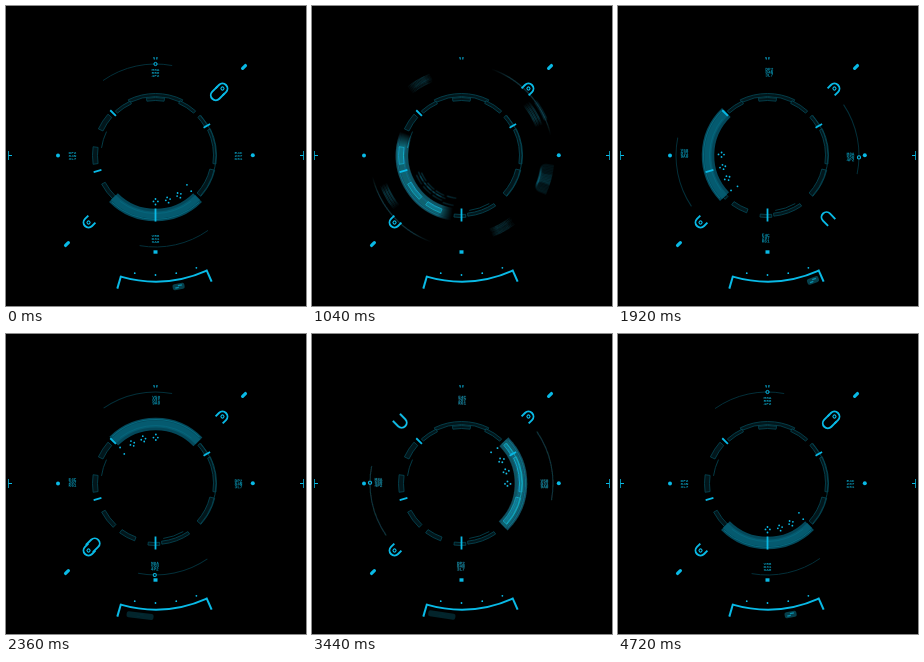
Recreate the animation shown at these times as an HTML page with a canvas. Size 300x300 px, loop 4760 ms.

```html
<!DOCTYPE html>
<html>
<head>
<meta charset="utf-8">
<style>
  html, body { margin: 0; width: 100%; height: 100%; overflow: hidden; background: #000; }
  canvas { display: block; }
</style>
</head>
<body>
<canvas id="stage" width="300" height="300"></canvas>
<script>
const stage = document.getElementById('stage').getContext('2d');
const layer = stage.canvas.cloneNode().getContext('2d');
let ctx = stage;   // context the helpers draw on

const LOOP = 4760, SPIN = 600, SHUTTER = 18, TAU = Math.PI * 2;
const BRIGHT = '#09bae6', TEXT = '#0890ae', DIM = '#064a57', FAINT = '#032f39';

const spinMids = [1023, 2150, 3277, 4409];   // middle of each quarter turn
const spinRests = [0, 91, 180.8, 271.5, 360];
const pointerRests = [80, 70, 100, 90, 80];

const rad = deg => deg * Math.PI / 180;
const clamp = x => Math.max(0, Math.min(1, x));
const expoInOut = p => p <= 0 ? 0 : p >= 1 ? 1
  : p < .5 ? 2 ** (20 * p - 10) / 2 : 1 - 2 ** (10 - 20 * p) / 2;

function stepped(t, rests, delay, duration) {
  return spinMids.reduce((v, mid, k) =>
    v + (rests[k + 1] - rests[k]) * expoInOut((t - mid - delay) / duration + .5), rests[0]);
}

function polar(r, deg) {
  return [r * Math.cos(rad(deg)), r * Math.sin(rad(deg))];
}

function line(points, color, width) {
  ctx.beginPath();
  points.forEach(p => ctx.lineTo(...p));
  ctx.strokeStyle = color;
  ctx.lineWidth = width;
  ctx.stroke();
}

const spoke = (deg, r0, r1, color, width) => line([polar(r0, deg), polar(r1, deg)], color, width);

function arc(r, a0, a1, color, width) {
  ctx.beginPath();
  ctx.arc(0, 0, r, rad(a0), rad(a1));
  ctx.strokeStyle = color;
  ctx.lineWidth = width;
  ctx.stroke();
}

function dot(x, y, r, color = BRIGHT) {
  ctx.beginPath();
  ctx.arc(x, y, r, 0, TAU);
  ctx.fillStyle = color;
  ctx.fill();
}

function ring(x, y, r, width) {
  ctx.beginPath();
  ctx.arc(x, y, r, 0, TAU);
  ctx.strokeStyle = BRIGHT;
  ctx.lineWidth = width;
  ctx.stroke();
}

function rotated(deg, draw) {
  ctx.save();
  ctx.rotate(rad(deg));
  draw();
  ctx.restore();
}

// Outlined piece of the dial
function band(r0, r1, a0, a1) {
  ctx.beginPath();
  ctx.arc(0, 0, r1, rad(a0), rad(a1));
  ctx.arc(0, 0, r0, rad(a1), rad(a0), true);
  ctx.closePath();
  ctx.fillStyle = '#02161b';
  ctx.fill();
  ctx.strokeStyle = DIM;
  ctx.lineWidth = .8;
  ctx.stroke();
}

// Half capsule on the x axis; the sign of arm tells where it opens
function cup(x, arm) {
  ctx.beginPath();
  ctx.moveTo(x + arm, -5);
  ctx.lineTo(x, -5);
  ctx.arc(x, 0, 5, -Math.PI / 2, Math.PI / 2, arm > 0);
  ctx.lineTo(x + arm, 5);
  ctx.strokeStyle = BRIGHT;
  ctx.lineWidth = 1.9;
  ctx.stroke();
}

function drawDial() {
  band(59, 62, -116, -64);
  band(55, 58, -99, -81);
  band(57, 60, -132, -115);
  band(57, 60, -66, -48);
  band(58, 63, -155, -139);
  band(58, 63, 172, 188);
  band(57, 61, 134, 152);
  band(57, 61, 110, 126);
  band(58, 61, 56, 84);
  band(59, 62, 86, 97);
  band(57, 60, -42, -31);
  band(58, 61, -26, 8);
  band(56, 61, 14, 42);
  arc(54.5, 188, 206, DIM, .8);
  arc(55.5, 60, 82, DIM, .8);
  arc(60.5, -42, 42, DIM, .8);
}

function drawFixed() {
  spoke(-135, 56, 64, BRIGHT, 1.8);
  spoke(-30, 55.5, 63, BRIGHT, 1.8);
  spoke(165, 56, 64, BRIGHT, 1.8);
  spoke(90, 53, 66, BRIGHT, 1.8);

  for (const deg of [-45, 135]) rotated(deg, () => {
    cup(94.7, -4.7);
    ring(94.7, 0, 1.5, 1.1);
    ctx.lineCap = 'round';
    line([[123.2, 0], [127.2, 0]], BRIGHT, 3.2);
    ctx.lineCap = 'butt';
  });

  dot(-97.5, 0, 2);
  dot(97.3, -.3, 2);
  line([[-2, 96.5], [2, 96.5]], BRIGHT, 3.4);
  line([[-1.6, -98.5], [-1.2, -96]], BRIGHT, 1);
  line([[1.5, -98.5], [1.3, -96]], BRIGHT, 1);

  arc(126, 66, 106, BRIGHT, 2);
  spoke(66, 125, 138, BRIGHT, 2);
  spoke(106, 125, 138.5, BRIGHT, 2);
  for (const deg of [70, 80, 90, 100]) dot(...polar(119.5, deg), .9);
}

const labels = [['M8A', '550', '4P2'], ['E4C', '207', 'K61'], ['V58', 'D31', '9A0'], ['DP2', '84N', '3L7']];

function drawLabels(turn) {
  const upright = Math.round(turn / 90) * 90;
  ctx.font = 'bold 4.4px "Liberation Mono", monospace';
  ctx.textAlign = 'center';
  ctx.textBaseline = 'middle';
  ctx.fillStyle = TEXT;
  labels.forEach((rows, i) => {
    ctx.save();
    ctx.translate(...polar(83, i * 90 - 90));
    ctx.rotate(rad(-upright));
    rows.forEach((row, j) => ctx.fillText(row, 0, (j - 1) * 2.9));
    ctx.restore();
  });
}

function drawSpinner(turn) {
  arc(59.5, 45, 135, '#04485a', 12.5);
  arc(59.5, 45, 135, '#055a6f', 7);
  arc(64, 47, 133, '#066a80', 1);
  arc(58, 52, 128, '#066a80', .8);
  for (const a of [90, 74.5, 59.5]) {
    dot(...polar(43.5, a), .9);
    dot(...polar(46, a - 3), .9);
    dot(...polar(46, a + 2.5), .9);
    dot(...polar(49, a), .9);
  }
  dot(...polar(43, 43), .9);
  dot(...polar(50.5, 45), .9);
  arc(91.5, -125, -79.5, FAINT, 1);
  arc(91.5, 55, 100, FAINT, 1);
  ring(0, -91.5, 1.6, 1);
  rotated(-45, () => cup(85.3, 7.5));
  drawLabels(turn);
}

function drawSpinnerLayer(turn) {
  ctx = layer;
  ctx.clearRect(0, 0, 300, 300);
  ctx.save();
  ctx.translate(149.5, 149.5);
  rotated(turn, () => drawSpinner(turn));
  ctx.restore();
  ctx = stage;
}

// Average several poses across the shutter while the spinner is fast
function drawBlurred(t) {
  const turnAt = time => stepped(time, spinRests, 0, SPIN);
  const sweep = turnAt(t + SHUTTER / 2) - turnAt(t - SHUTTER / 2);
  const samples = sweep < .4 ? 1 : 14;
  ctx.save();
  ctx.globalCompositeOperation = samples > 1 ? 'lighter' : 'source-over';
  ctx.globalAlpha = 1 / samples;
  for (let i = 0; i < samples; i++) {
    drawSpinnerLayer(turnAt(t + ((i + .5) / samples - .5) * SHUTTER));
    ctx.drawImage(layer.canvas, -149.5, -149.5);
  }
  ctx.restore();
}

function drawPointer(t) {
  if (spinMids.some(mid => t > mid - 60 && t < mid + 100)) return;
  const angle = stepped(t, pointerRests, 185, 240);
  const stretch = Math.max(...spinMids.map(mid =>
    Math.sin(Math.PI * clamp((t - mid - 65) / 240))));
  rotated(angle - 90, () => {
    const half = 6 + 8 * stretch;
    ctx.globalAlpha = 1 - .45 * stretch;
    ctx.beginPath();
    ctx.roundRect(-half, 130, 2 * half, 6, 2);
    ctx.fillStyle = '#06404c';
    ctx.fill();
    ctx.globalAlpha = 1 - stretch;
    line([[-3.5, 134], [0, 134]], TEXT, 1.3);
    line([[-.5, 132], [3.5, 132]], TEXT, 1.3);
    ctx.globalAlpha = 1;
  });
}

function drawSideMarks(t) {
  const phase = t % 400;
  if (phase >= 80 && phase < 160) return;
  for (const side of [-1, 1]) {
    const x = side * 147.5 + .5;
    line([[x, -4.5], [x, 4.5]], TEXT, 1);
    line([[x, 0], [x - side * 3.5, 0]], BRIGHT, 1);
  }
}

function frame(now) {
  const t = now % LOOP;
  ctx.fillStyle = '#000';
  ctx.fillRect(0, 0, 300, 300);
  ctx.save();
  ctx.translate(149.5, 149.5);
  drawDial();
  drawBlurred(t);
  drawFixed();
  drawPointer(t);
  drawSideMarks(t);
  ctx.restore();
  requestAnimationFrame(frame);
}
requestAnimationFrame(frame);
</script>
</body>
</html>
```
